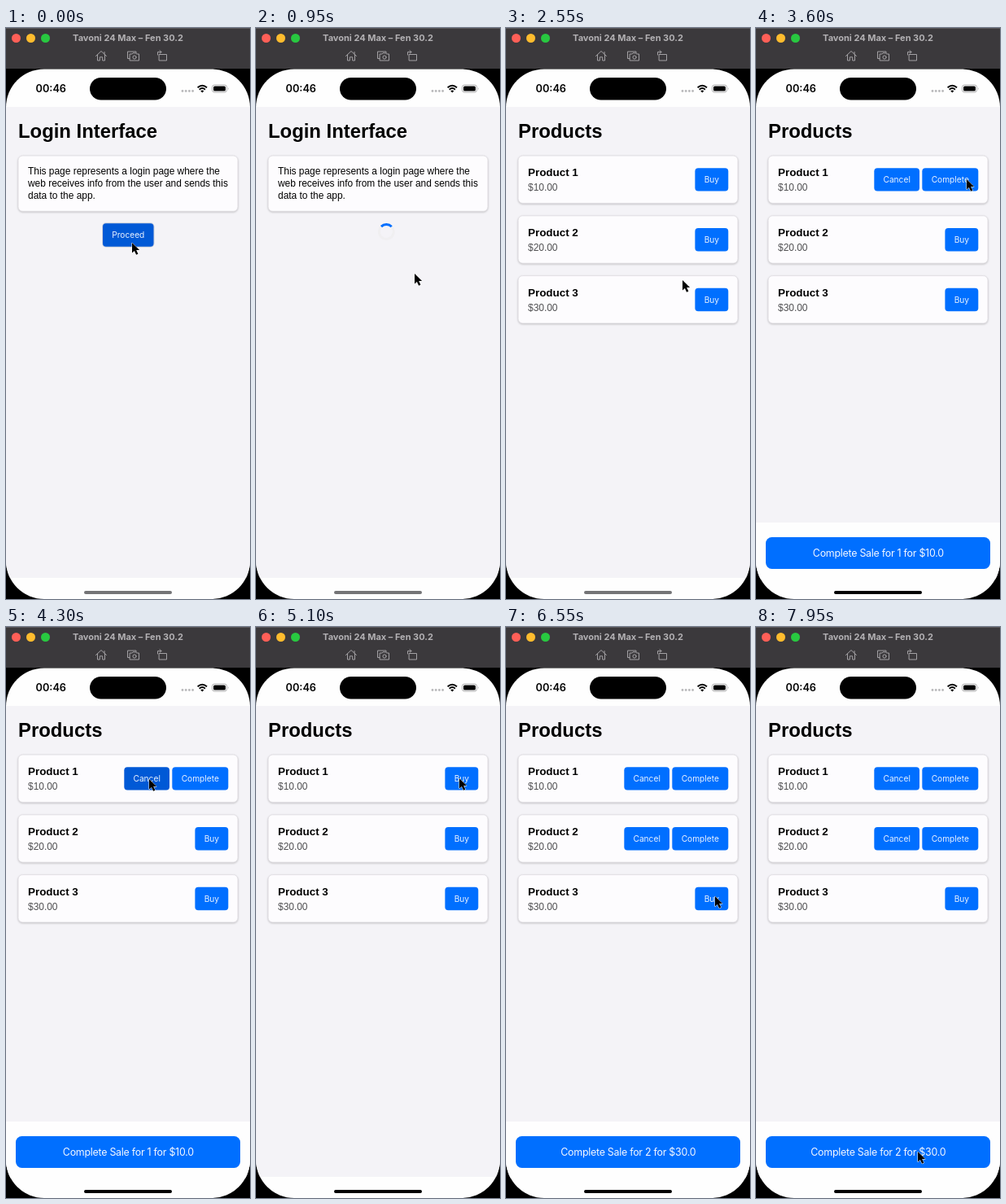
Write an HTML page that moves like this. It is 300 by 702 pixels and loops after 8000 ms.

```html
<!DOCTYPE html>
<html lang="en">
<head>
<meta charset="utf-8">
<title>Web and app demo</title>
<style>
  html, body { margin: 0; width: 100%; height: 100%; overflow: hidden; background: #000; }
  svg { display: block; width: 300px; height: 702px; }
  text { font-family: "Liberation Sans", Arial, sans-serif; font-size: 11.93px; }
  .ui { font-family: Inter, Roboto, sans-serif; text-anchor: middle; }
  .title { font-size: 11px; font-weight: 700; fill: #b3b1b4; }
  .clock { font-size: 12.7px; font-weight: 600; }
  .h1 { font-size: 23.87px; font-weight: 700; }
  .name { font-size: 13.4px; font-weight: 700; }
  .price { fill: #505052; }
  .label { font-size: 10.2px; fill: #e9f2ff; }
  .sale { font-size: 12.4px; letter-spacing: -.25px; fill: #f4f8ff; }
  .card { fill: #fdfcfe; stroke: #dddbe0; stroke-width: .8; filter: drop-shadow(0 1.2px 1.2px #0003); }
  .icon { fill: none; stroke: #a3a1a4; stroke-width: 1; stroke-linejoin: round; stroke-linecap: round; }
</style>
</head>
<body>
<svg viewBox="0 0 300 702">
  <rect width="300" height="702"/>
  <rect width="300" height="50" fill="#3b393c"/>
  <rect width="300" height="1" fill="#59575a"/>
  <circle cx="12.5" cy="12.5" r="5.5" fill="#fe5f57"/>
  <circle cx="30.5" cy="12.5" r="5.5" fill="#febc2e"/>
  <circle cx="48.5" cy="12.5" r="5.5" fill="#28c840"/>
  <text class="ui title" x="150" y="16">Tavoni 24 Max – Fen 30.2</text>
  <g class="icon">
    <path d="M110.5 34.5L117 28.5L123.5 34.5M112.5 33V40H115.3V35.8H118.7V40H121.5V33M121 32V29.5"/>
    <path d="M152 37.5H149.5V29H160V30.5M152.5 32H155L156 30.8H159.5L160.5 32H163.5V40H152.5Z"/>
    <circle cx="158" cy="36" r="2.1"/>
    <path d="M188.5 32.5H197.5V40H188.5ZM186.5 33V29.5H191M189 27.5L191 29.5L189 31.5"/>
  </g>

  <clipPath id="screen"><rect y="50.5" width="300" height="651.5" rx="47"/></clipPath>
  <g clip-path="url(#screen)">
    <rect y="50" width="300" height="652" fill="#fefefe"/>
    <rect y="97" width="300" height="579" fill="#f4f3f7"/>
    <text class="ui clock" x="55.3" y="79.3">00:46</text>
    <rect x="103" y="61" width="94" height="27.5" rx="13.75"/>
    <g fill="#b9b9bb">
      <circle cx="217" cy="77.5" r="1.4"/><circle cx="221.2" cy="77.5" r="1.4"/>
      <circle cx="225.4" cy="77.5" r="1.4"/><circle cx="229.6" cy="77.5" r="1.4"/>
    </g>
    <g fill="none" stroke="#000" stroke-width="1.9">
      <path d="M235.6 73.3Q241.3 68.1 247 73.3M237.7 75.7Q241.3 72.5 244.9 75.7"/>
    </g>
    <path d="M239.3 77.4Q241.3 75.8 243.3 77.4L241.3 79.5Z"/>
    <rect x="253.5" y="70" width="18" height="9" rx="2.8" fill="none" stroke="#a6a6a8" stroke-width=".9"/>
    <rect x="255" y="71.4" width="15" height="6.2" rx="1.7"/>
    <path d="M273 73V76.2Q274.4 74.6 273 73Z" fill="#a6a6a8"/>
    <g id="page"></g>
    <rect id="home" x="96" y="692" width="108" height="4" rx="2"/>
  </g>
  <path id="cursor" d="M0 0V12.6L2.9 9.9L5.1 14.8L7.4 13.8L5.2 9.1H9.1Z" stroke="#fff" stroke-width="1" stroke-linejoin="round" paint-order="stroke"/>
</svg>
<script>
const LOOP = 8000, BLUE = '#006fff', PRESSED = '#0059d6';
const SPIN_START = 150, PRODUCTS = 1600;
const BUY_1 = 3150, CANCEL_1 = 4400, REBUY_1 = 5250, BUY_2 = 6000;

// Pointer stops: time, x, y
const stops = [
  [0, 155, 264], [250, 155, 264], [950, 195, 302], [1700, 209, 306], [2550, 217, 310],
  [2950, 254, 186], [3250, 254, 186], [3600, 259, 186], [4150, 176, 187], [4500, 176, 187],
  [4950, 250, 186], [5350, 250, 186], [5800, 253, 260], [6150, 253, 260],
  [6500, 257, 331], [6800, 257, 331], [7550, 199, 645], [8000, 199, 645]
];
const page = document.getElementById('page');
const home = document.getElementById('home');
const cursor = document.getElementById('cursor');

const text = (cls, x, y, s) => `<text class="${cls}" x="${x}" y="${y}">${s}</text>`;
const card = (y, h) => `<rect class="card" x="15" y="${y}" width="270" height="${h}" rx="5.5"/>`;
const button = (x, y, w, label, pressed) =>
  `<rect x="${x}" y="${y}" width="${w}" height="28.4" rx="4" fill="${pressed ? PRESSED : BLUE}"/>` +
  text('ui label', x + w / 2, y + 17.9, label);

function loginPage(t) {
  const lines = ['This page represents a login page where the',
    'web receives info from the user and sends this', 'data to the app.'];
  let out = text('h1', 15, 135, 'Login Interface') + card(157, 68.3) +
    lines.map((s, i) => text('', 27, 180 + i * 15, s)).join('');
  if (t < SPIN_START) {
    out += '<rect x="118" y="239.3" width="64.5" height="30.4" rx="5" fill="#cfd3dc"/>' +
      button(119, 240.3, 62.5, 'Proceed', true);
  } else {
    const angle = (t - 950) * .36;
    out += `<g fill="none" stroke-width="3" transform="translate(160.3 250.5) rotate(${angle})">
      <circle r="9" stroke="#f0eff1"/><path d="M-6.36 -6.36A9 9 0 0 1 6.36 -6.36" stroke="${BLUE}"/></g>`;
  }
  return out;
}

function productsPage(t) {
  const chosen = [(t >= BUY_1 && t < CANCEL_1) || t >= REBUY_1, t >= BUY_2, false];
  const pressing = time => t >= time - 100 && t < time;
  const buyPressed = [pressing(BUY_1) || pressing(REBUY_1), pressing(BUY_2), false];
  let out = text('h1', 15, 135, 'Products'), count = 0, total = 0;
  chosen.forEach((on, i) => {
    const y = 157 + i * 73.8, price = (i + 1) * 10;
    out += card(y, 58.4) + text('name', 27, y + 25, `Product ${i + 1}`) +
      text('price', 27, y + 43.3, `$${price}.00`);
    if (on) {
      count++;
      total += price;
      out += button(145.3, y + 15.2, 55.7, 'Cancel', i === 0 && pressing(CANCEL_1)) +
        button(204.3, y + 15.2, 69, 'Complete');
    } else {
      out += button(232.4, y + 15.2, 40.9, 'Buy', buyPressed[i]);
    }
  });
  if (count) {
    out += `<rect y="608" width="300" height="70" fill="#fefefe"/>
      <rect x="12" y="626" width="276" height="39" rx="7.5" fill="${BLUE}"/>` +
      text('ui sale', 150.3, 650, `Complete Sale for ${count} for $${total}.0`);
  }
  return out;
}

function pointerAt(t) {
  const i = stops.findIndex(s => s[0] > t);
  const [t0, x0, y0] = stops[i - 1], [t1, x1, y1] = stops[i];
  const p = (t - t0) / (t1 - t0), k = p * p * (3 - 2 * p);
  return [x0 + (x1 - x0) * k, y0 + (y1 - y0) * k];
}

let shown = '';
function draw(now) {
  const t = now % LOOP;
  const next = t < PRODUCTS ? loginPage(t) : productsPage(t);
  if (next !== shown) page.innerHTML = shown = next;
  home.setAttribute('fill', t < BUY_1 ? '#747476' : '#000');
  cursor.setAttribute('transform', `translate(${pointerAt(t)})`);
  requestAnimationFrame(draw);
}
const start = performance.now();
draw(0);
requestAnimationFrame(function frame() {
  draw = (() => {
    const paint = draw;
    return () => paint(Math.max(0, performance.now() - start));
  })();
});
</script>
</body>
</html>
```
